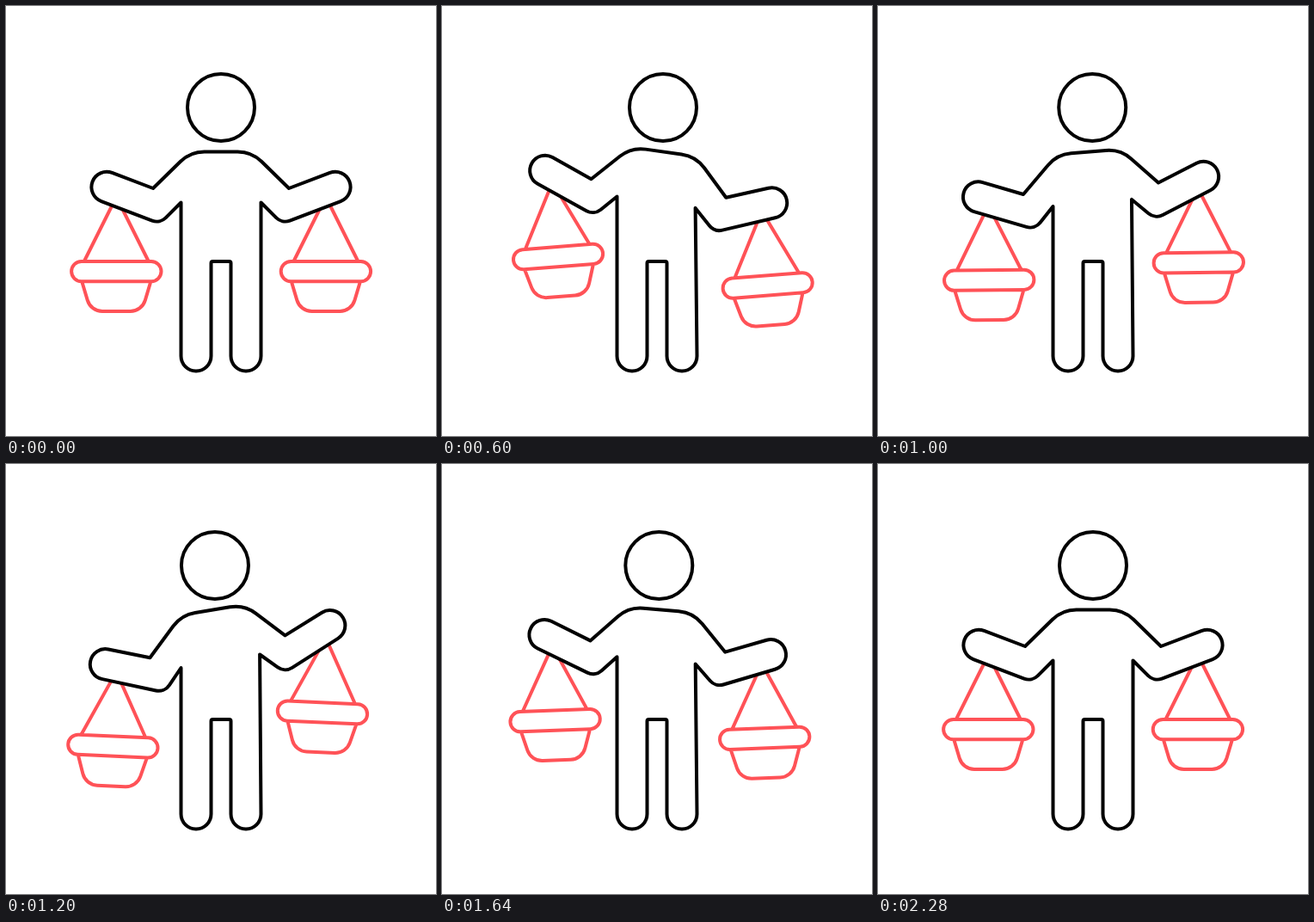
An HTML page with a canvas that plays this animation: 500x500 px, repeating every 2600 ms.

```html
<!DOCTYPE html>
<html>
<head>
<meta charset="utf-8">
<style>
html, body { margin: 0; width: 100%; height: 100%; overflow: hidden; background: #fff; }
canvas { display: block; }
</style>
</head>
<body>
<canvas id="stage" width="500" height="500"></canvas>
<script>
const ctx = document.getElementById('stage').getContext('2d');
const LOOP = 2600, STEP = 40, LAG = 80, HAND = 17.7;
const BLACK = '#000', RED = '#ff5257';

// Each joint: rest x, y, then its offset when leaning right and when leaning left
const joints = {
  handL:  [117.1, 210.5, 2.8, -19.1, -1.6, 22.3],
  elbowL: [171, 212, 2.5, -10.8, -3.6, 13.2],
  neckL:  [214.5, 169.5, 5.6, -5.2, -10.5, 6.1],
  neckR:  [285.5, 169.5, 9.6, 5.2, -8.4, -5.9],
  elbowR: [329, 212, 1.3, 10.8, -4.5, -12.6],
  handR:  [382.9, 210.5, 0.6, 18.5, -6.2, -22.7],
  underR: [321, 253, -4.3, 9.8, 3.2, -10.7],
  pitR:   [296.5, 228.5, -1.9, 6.4, -1.4, -7],
  pitL:   [203.5, 228.5, 0, -7, 0, 8.5],
  underL: [179, 253, -2.2, -9.9, 5.3, 12.6],
  panL:   [128.3, 222, 0, -16.8, 0, 19.6],
  panR:   [371.9, 222, 0, 16.6, 0, -19.6]
};

const times = [200, 600, 1200, 1800, 2200];
const poses = [[0, 0], [1, 0], [0, 1], [1, 0], [0, 0]];

// Weights of the right and left lean at a time
function lean(t) {
  if (t <= times[0] || t >= times[4]) return poses[0];
  const i = times.findIndex(k => k > t) - 1;
  const p = (t - times[i]) / (times[i + 1] - times[i]);
  const e = p * p * (3 - 2 * p);
  return poses[i].map((v, k) => v + (poses[i + 1][k] - v) * e);
}

function stroke(color) {
  ctx.strokeStyle = color;
  ctx.stroke();
}

function drawPan([x, y], angle) {
  ctx.save();
  ctx.translate(x, y);
  ctx.rotate(angle * Math.PI / 180);
  ctx.beginPath();
  ctx.moveTo(-37.5, 75);
  ctx.lineTo(0, 0);
  ctx.lineTo(37.5, 75);
  ctx.roundRect(-52.2, 75, 104.4, 23.2, 11.6);
  ctx.moveTo(-40, 98.5);
  ctx.arcTo(-29.7, 133, 0, 133, 18);
  ctx.arcTo(29.7, 133, 40, 98.5, 18);
  ctx.lineTo(40, 98.5);
  stroke(RED);
  ctx.restore();
}

function drawBody(j) {
  const corner = (a, b, r) => ctx.arcTo(...a, ...b, r);
  // Round hand whose upper edge runs straight to the elbow
  const hand = (h, e, side) => {
    const dx = e[0] - h[0], dy = e[1] - h[1];
    const dir = Math.atan2(dy, dx) + side * Math.asin(HAND / Math.hypot(dx, dy));
    const q = Math.PI / 2;
    ctx.arc(...h, HAND, dir + q, dir + 3 * q);
  };
  ctx.beginPath();
  ctx.moveTo(...j.pitL);
  corner(j.underL, j.handL.map((v, i) => v + [-6, 16.6][i]), 15);
  hand(j.handL, j.elbowL, 1);
  ctx.lineTo(...j.elbowL);
  corner(j.neckL, j.neckR, 39.6);
  corner(j.neckR, j.elbowR, 39.6);
  ctx.lineTo(...j.elbowR);
  hand(j.handR, j.elbowR, -1);
  corner(j.underR, j.pitR, 15);
  ctx.lineTo(...j.pitR);
  ctx.lineTo(296.5, 407);
  ctx.arc(279, 407, 17.5, 0, Math.PI);
  ctx.arcTo(261.5, 297, 250, 297, 2);
  ctx.arcTo(238.5, 297, 238.5, 400, 2);
  ctx.lineTo(238.5, 407);
  ctx.arc(221, 407, 17.5, 0, Math.PI);
  ctx.closePath();
  ctx.fillStyle = '#fff';
  ctx.fill();
  stroke(BLACK);
}

function draw(now) {
  const t = Math.floor(now % LOOP / STEP) * STEP;
  const [a, b] = lean(t), [lateA, lateB] = lean(t - LAG);
  const j = {};
  for (const k in joints) {
    const [x, y, ax, ay, bx, by] = joints[k];
    j[k] = [x + a * ax + b * bx, y + a * ay + b * by];
  }
  ctx.fillStyle = '#fff';
  ctx.fillRect(0, 0, 500, 500);
  ctx.lineWidth = 4;
  ctx.lineJoin = 'round';
  const swing = 3 * lateB - 5 * lateA;
  drawPan(j.panL, swing);
  drawPan(j.panR, swing);
  drawBody(j);
  ctx.beginPath();
  ctx.arc(250 + 7.8 * (lateA - lateB), 118, 39, 0, 7);
  stroke(BLACK);
}

const start = performance.now();
function tick() {
  draw(performance.now() - start);
  requestAnimationFrame(tick);
}
tick();
</script>
</body>
</html>
```
